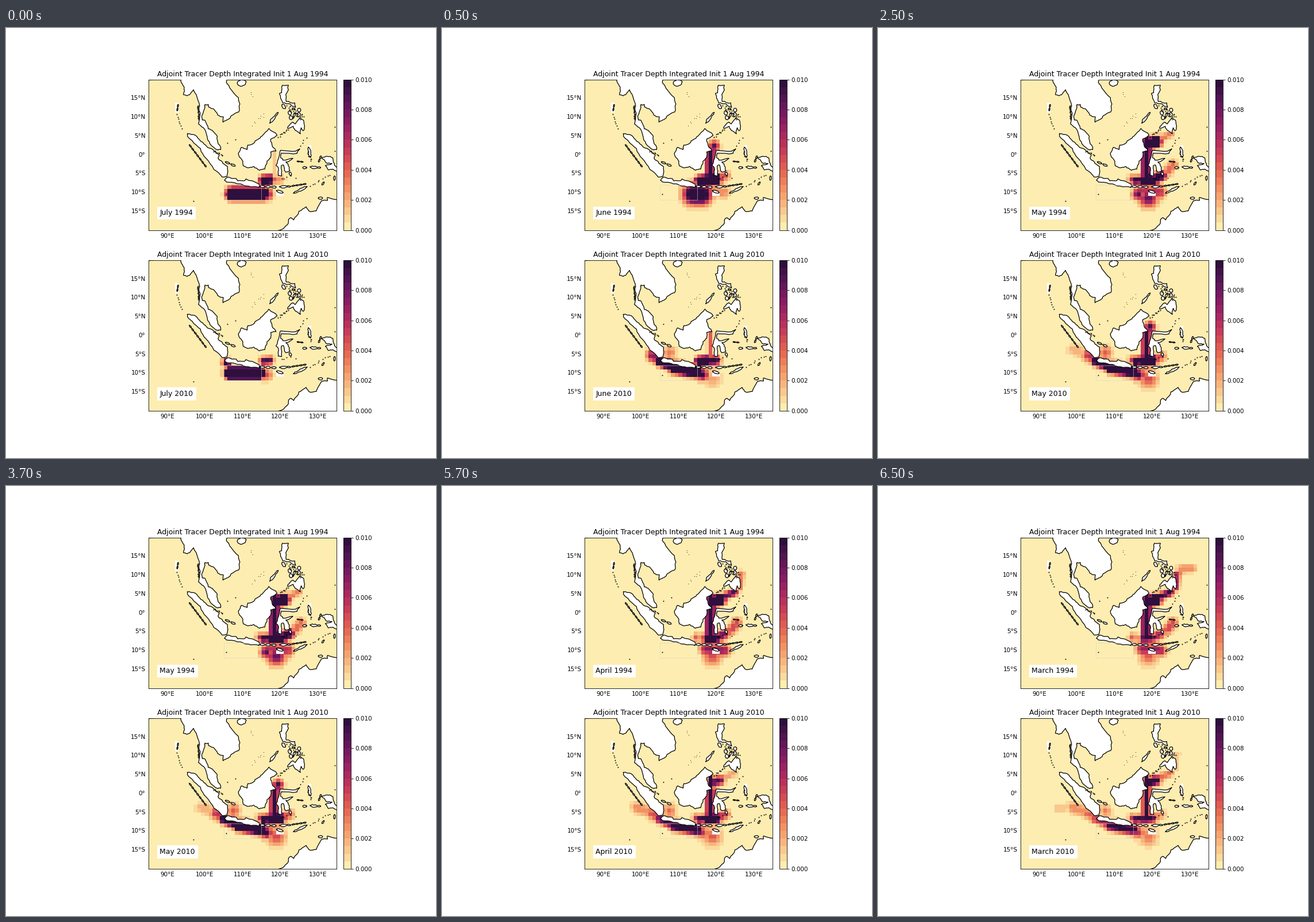
Write a matplotlib script that moves like this. It is 748 px wide and 748 px high and loops after 8 s.

```python
import numpy as np
import matplotlib.pyplot as plt
from matplotlib.animation import FuncAnimation
from matplotlib.collections import PolyCollection
from matplotlib.colors import LinearSegmentedColormap
from matplotlib.patches import Rectangle

SIZE = 748
plt.rcParams["font.family"] = "DejaVu Sans"
MATTER = LinearSegmentedColormap.from_list("matter", [
    "#fdedb0", "#facd91", "#f6ad77", "#f08e62", "#e76d54", "#d85053",
    "#c3385a", "#a82860", "#8a1d63", "#6b185d", "#4c1550", "#2f0f3d"], N=20)

rng = np.random.default_rng(4)
coasts, islets = [], []


def coast(*flat):
    """Add a land outline given as lon, lat, lon, lat..., roughened a little."""
    pts = np.array(flat, float).reshape(-1, 2)
    for _ in range(2):
        step = np.roll(pts, -1, axis=0) - pts
        normal = np.c_[-step[:, 1], step[:, 0]]
        bend = np.clip(rng.normal(0, 0.09, (len(pts), 1)), -0.16, 0.16)
        size = np.hypot(*step.T)[:, None]
        mid = pts + step / 2 + normal * bend * np.minimum(1, 1.2 / size)
        pts = np.stack([pts, mid], axis=1).reshape(-1, 2)
    coasts.append(pts)


def chain(x0, y0, x1, y1, count, width):
    """Add a row of long islands from one point to another."""
    start, step = np.array([x0, y0]), np.array([x1 - x0, y1 - y0]) / count
    across = np.array([-step[1], step[0]]) / np.hypot(*step) * width / 2
    reach = step * (0.5 if count == 1 else 0.42)
    for i in range(count):
        turn = np.linspace(0, 2 * np.pi, 9)[:-1, None]
        ring = start + step * (i + 0.5) + np.cos(turn) * reach + np.sin(turn) * across
        coast(*ring.ravel())


def dots(x0, y0, x1, y1, count, spread):
    """Scatter islets around a line."""
    t = np.linspace(0, 1, count)[:, None]
    line = np.array([x0, y0]) * (1 - t) + np.array([x1, y1]) * t
    islets.append(line + rng.uniform(-spread, spread, line.shape))


# Mainland
coast(93.7, 21, 93.6, 19.6, 94.5, 18, 94.3, 16, 95.3, 15.7, 96.3, 16.5, 97, 17.3, 97.7, 16,
      98.6, 13, 98.7, 10.5, 98.3, 8.2, 99.2, 7.4, 100.2, 6.3, 100.7, 4.2, 101.3, 3,
      103.5, 1.3, 104.2, 1.4, 103.4, 3.5, 103.3, 4.9, 102.2, 6.2, 100.9, 6.9, 100, 9.2,
      99.3, 9.3, 99.2, 10.4, 100, 12.6, 100, 13.4, 100.9, 13.4, 101, 12.7, 102.3, 12.2,
      103.4, 10.6, 104.9, 10.1, 104.8, 8.7, 106.2, 9.4, 107, 10.4, 109, 11.4, 109.3, 13.5,
      108.9, 15.2, 106.6, 17.8, 105.7, 19.3, 105.9, 21)
coast(84, 19.4, 86.3, 20, 87, 21, 84, 21)
chain(108.6, 18.9, 111, 19.4, 1, 1.7)
# Sumatra, Java and the Sunda chain
coast(95.3, 5.6, 97.5, 5.2, 98.9, 3.6, 100.5, 2.2, 102, 1.5, 103.8, 0, 103.5, -0.9,
      104.8, -2.3, 106, -3.1, 105.8, -5.8, 104.6, -5.9, 102.4, -3.9, 100.4, -1,
      98.8, 1.7, 97, 3.2, 95.4, 4.9)
coast(105.2, -6.8, 106.1, -5.9, 108.3, -6.3, 108.7, -6.9, 110.4, -6.9, 110.9, -6.4,
      112.6, -6.9, 114.4, -7.8, 114.4, -8.7, 111.5, -8.3, 109.4, -7.7, 106.4, -7.3)
chain(105.3, -1.8, 108.2, -3, 2, 0.5)
chain(114.5, -8.4, 119.1, -8.6, 3, 0.6)
chain(119.8, -8.5, 122.9, -8.4, 1, 0.5)
chain(123, -8.3, 127, -7.7, 4, 0.3)
chain(119, -9.5, 120.8, -10.1, 1, 0.6)
chain(123.5, -10.2, 127.2, -8.4, 1, 0.7)
# Borneo, Sulawesi
coast(108.9, 0.4, 109.2, -0.6, 110.1, -1.7, 110.2, -2.9, 111.8, -3.4, 113, -3.1, 114.5, -4.1,
      115.9, -3.8, 116.5, -1.7, 117.5, -0.7, 117.5, 0.8, 118.9, 1, 118, 2.1, 117.5, 4.2,
      119.2, 5.2, 117, 7, 115.2, 5, 113.9, 4, 113, 3.1, 111.4, 2.6, 111.2, 1.4, 109.7, 2)
coast(120.1, 1.2, 124, 0.95, 125.2, 1.6, 124.5, 0.4, 120.3, 0.45, 120.1, -0.7, 120.7, -1.4,
      123.4, -0.9, 121.5, -1.9, 122.4, -3.2, 122.6, -4.2, 121.5, -4.6, 120.9, -2.7,
      120.3, -2.9, 120.4, -5.6, 119.5, -5.5, 119.5, -3.4, 118.9, -2.8, 119.8, -0.1)
chain(122.5, -4.6, 122.9, -5.5, 1, 0.6)
# Philippines
coast(120.6, 18.5, 122.2, 18.5, 122.2, 17.3, 121.5, 16, 121.6, 14.2, 123.9, 13.8, 124.1, 12.6,
      122.5, 13.6, 120.7, 13.8, 119.8, 16.3, 120.4, 16.5)
coast(122, 7, 122.5, 8, 123.4, 8.7, 124, 8.2, 125.4, 9.8, 126.2, 9.2, 126.5, 7.5, 126.1, 6.4,
      125.6, 7.2, 125.4, 5.6, 124, 6.5, 123.5, 7.6)
chain(120.5, 13.4, 121.4, 12.3, 1, 0.8)
chain(117.2, 8.4, 119.5, 11.3, 1, 0.6)
chain(122.4, 11.8, 123, 9.2, 2, 0.9)
chain(123.4, 9.6, 124, 11.2, 1, 0.4)
chain(125.1, 12.5, 124.9, 10.1, 2, 0.9)
chain(123.2, 12.4, 124, 12, 1, 0.4)
# Moluccas, New Guinea, Australia
chain(127.5, 2.1, 128.1, -0.7, 1, 0.7)
chain(126, -3.4, 127.1, -3.4, 1, 0.6)
chain(127.9, -3.2, 130.8, -3.4, 1, 0.6)
chain(124.4, -1.7, 126.2, -1.9, 2, 0.25)
chain(130.2, -2, 130.9, -0.2, 2, 0.4)
chain(134.4, -6.8, 134.5, -5.6, 1, 0.5)
chain(131.1, -8, 131.7, -7.2, 1, 0.4)
chain(130.1, -11.5, 131.3, -11.5, 1, 0.6)
coast(131, -0.8, 132.5, -0.4, 134, -0.8, 134.2, -2, 135, -3.3, 136, -3, 136, -4.6, 134, -3.8,
      132.8, -4, 132, -2.9, 133.8, -2.3, 132.2, -2.1)
coast(136, -12.2, 132.6, -11.3, 132.6, -12.1, 131, -12.2, 129.6, -14.9, 128, -15.1,
      126.9, -13.8, 125, -15, 123.6, -17.3, 122.9, -16.7, 122.2, -17.3, 122.2, -18.1,
      120.9, -19.6, 118, -21, 136, -21)
# West of Sumatra
chain(95.8, 2.8, 100.4, -3.3, 7, 0.3)
chain(92.6, 11.6, 92.9, 13.5, 2, 0.3)

dots(98.2, 13, 98.3, 9.5, 24, 0.15)
dots(92.6, 10.7, 93.8, 7, 7, 0.1)
dots(102.5, 1, 104.6, -0.2, 9, 0.25)
dots(119.6, 4.9, 122, 6.7, 11, 0.25)
dots(125.3, 2.5, 126.9, 4.4, 4, 0.2)
dots(128, -8.1, 133, -5.5, 9, 0.3)
dots(127.4, 0.8, 128.2, -1.7, 8, 0.3)
dots(122, 12.8, 125.8, 9.8, 28, 0.7)
dots(120.3, -6.2, 123.8, -5.7, 5, 0.4)
dots(105.6, -10.5, 96.9, -12.2, 2, 0)
dots(134.5, 7.4, 134.6, 1, 2, 0)
dots(106, 3.1, 108.1, 4, 2, 0)
shoals_from = len(islets)
dots(112, 16.6, 112.5, 15.8, 3, 0.3)
dots(112.5, 8.2, 116, 10.8, 8, 0.6)

# Extra masked blocks: lon, lat, width, height
MASKED = [(92, 11.3, 0.9, 2.6), (127.3, -0.2, 1, 2.8), (119, -10.9, 2, 0.9)]

# Tracer pathways: start (and end) point, then width, all in degrees
PATHS = dict(
    basin=(106.3, -10, 114.7, -10, 0.8),
    coastal=(107.3, -10.3, 115.3, -10.3, 1.4),
    sunda=(105.8, -7.3, 1.1),
    bali=(116.3, -10.4, 1.5),
    lombok=(114, -10.4, 116, -10.5, 2.4),
    west_java=(105, -6.8, 109, -8.4, 1.1),
    java=(109, -8.5, 115, -9.6, 1.3),
    sumatra=(103, -5.3, 104.5, -6, 1.5),
    mentawai=(99, -3.8, 102, -4.8, 1.5),
    ocean=(94.5, -4, 96.5, -4, 1),
    java_sea=(107.6, -4.6, 1.6),
    savu=(117.3, -9.6, 122, -9.9, 1.6),
    sumba=(119, -11.5, 2.3),
    kangean=(114.8, -6.6, 1.1),
    bali_sea=(115.6, -6.8, 117.2, -6.6, 1),
    flores=(117.8, -6.8, 119.9, -6.6, 1.2),
    banda=(121, -6.4, 122.4, -5.5, 1.2),
    ceram=(124, -4.5, 125.5, -2.7, 1.3),
    makassar=(118.5, -6, 118.5, 0.5, 0.75),
    north=(118.5, 0.5, 118.5, 4, 0.75),
    inlet=(119.5, 2.3, 1.3),
    celebes=(119.3, 3, 121, 3.5, 1.2),
    mindanao=(121.5, 4.1, 124.8, 5.4, 0.95),
    davao=(126.2, 6.5, 126.8, 10.5, 0.85),
    pacific=(127.7, 11.7, 130.7, 11.9, 1.2))

LON, LAT = np.meshgrid(np.arange(85.5, 135), np.arange(-19.5, 20))


def tracer(**peaks):
    """Strongest pathway at each cell; peaks above 1 saturate."""
    field = np.zeros_like(LON)
    for name, peak in peaks.items():
        *ends, width = PATHS[name]
        x0, y0, x1, y1 = ends if len(ends) == 4 else ends * 2
        dx, dy = x1 - x0, y1 - y0
        px, py = LON - x0, LAT - y0
        along = np.clip((px * dx + py * dy) / max(dx * dx + dy * dy, 1e-9), 0, 1)
        dist2 = (px - along * dx) ** 2 + (py - along * dy) ** 2
        field = np.maximum(field, peak * np.exp(-dist2 / width ** 2))
    return 0.01 * np.clip(field, 0, 1)


MONTHS = [
    ("July",
     tracer(coastal=2.8, bali=1, bali_sea=2.2, makassar=0.1, flores=0.3),
     tracer(basin=30, sunda=1.1, bali=0.5, bali_sea=0.95)),
    ("June",
     tracer(lombok=1.6, savu=0.3, bali_sea=2.4, flores=3, banda=0.5, makassar=3.5, inlet=0.9),
     tracer(west_java=2, java=2.6, bali=1, sumba=0.25, sumatra=0.75, java_sea=0.35,
            bali_sea=2.4, flores=1.1, makassar=0.4)),
    ("May",
     tracer(bali=0.9, savu=0.6, sumba=0.85, bali_sea=1.2, kangean=0.7, flores=2.2, banda=1.4,
            ceram=0.4, makassar=4, north=4, celebes=2.5, mindanao=0.35),
     tracer(west_java=1.5, java=2, bali=1, sumatra=0.6, mentawai=0.2, java_sea=0.45, sumba=0.5,
            bali_sea=1.6, kangean=0.6, flores=2.3, banda=0.5, makassar=3, inlet=0.95)),
    ("April",
     tracer(savu=0.72, sumba=0.5, kangean=0.45, flores=1.6, banda=0.85, ceram=0.5,
            makassar=4, north=4, celebes=2.5, mindanao=0.9, davao=0.35),
     tracer(west_java=0.95, java=1.5, bali=0.6, sumatra=0.5, mentawai=0.3, java_sea=0.4,
            sumba=0.42, bali_sea=1, kangean=0.6, flores=1.9, banda=0.6, makassar=3, north=2,
            celebes=0.95, mindanao=0.25)),
    ("March",
     tracer(savu=0.7, sumba=0.42, kangean=0.45, flores=1, banda=0.65, ceram=0.5,
            makassar=4, north=4, celebes=2.5, mindanao=1, davao=0.65, pacific=0.3),
     tracer(west_java=0.65, java=1.2, bali=0.6, sumatra=0.42, mentawai=0.3, ocean=0.15,
            java_sea=0.32, sumba=0.36, bali_sea=1, kangean=0.6, flores=1, banda=0.3,
            makassar=2.5, north=2.5, celebes=1.3, mindanao=0.4, davao=0.12)),
]

fig = plt.figure(figsize=(10, 10), dpi=SIZE / 10, facecolor="white")


def make_panel(bottom, year):
    ax = fig.add_axes([247.8 / SIZE, bottom, 0.4375, 0.35])
    ax.set(xlim=(85, 135), ylim=(-20, 20), xticks=[], yticks=[])
    ax.set_title(f"Adjoint Tracer Depth Integrated Init 1 Aug {year}", fontsize=12)
    mesh = ax.pcolormesh(np.arange(85, 136), np.arange(-20, 21), np.zeros_like(LON),
                         cmap=MATTER, vmin=0, vmax=0.01)
    for lon, lat, w, h in MASKED:
        ax.add_patch(Rectangle((lon, lat), w, h, fc="white", lw=0, zorder=2))
    ax.add_collection(PolyCollection(coasts, fc="white", ec="black", lw=1.2, zorder=3),
                      autolim=False)
    for i, group in enumerate(islets):
        ax.scatter(*group.T, s=3.5 if i < shoals_from else 1, c="black", lw=0, zorder=4)
    ax.add_patch(Rectangle((105, -12), 10, 4, fill=False, ec="lightgray", lw=0.5, zorder=4))

    for lon in range(90, 131, 10):
        ax.annotate(f"{lon}°E", (lon, -20), (0, -5), textcoords="offset points",
                    ha="center", va="top", fontsize=10)
    for lat in range(-15, 16, 5):
        side = "N" if lat > 0 else "S" if lat < 0 else ""
        ax.annotate(f"{abs(lat)}°{side}", (85, lat), (-5, 0), textcoords="offset points",
                    ha="right", va="center", fontsize=10)

    bar_ax = fig.add_axes([587 / SIZE, bottom, 0.0175, 0.35])
    bar = fig.colorbar(mesh, cax=bar_ax, ticks=np.arange(0, 0.0101, 0.002))
    bar.ax.set_yticklabels([f"{0.002 * i:.3f}" for i in range(6)])
    label = ax.text(88, -16, "", fontsize=12, zorder=6,
                    bbox=dict(facecolor="white", edgecolor="white"))
    return mesh, label, year


panels = [make_panel(0.53, 1994), make_panel(0.11, 2010)]


def draw(frame):
    name, *fields = MONTHS[(frame + 3) // 4]
    for (mesh, label, year), field in zip(panels, fields):
        mesh.set_array(field)
        label.set_text(f"{name} {year}")
    return []


anim = FuncAnimation(fig, draw, frames=16, interval=500, repeat=True, repeat_delay=0)
plt.show()
```
